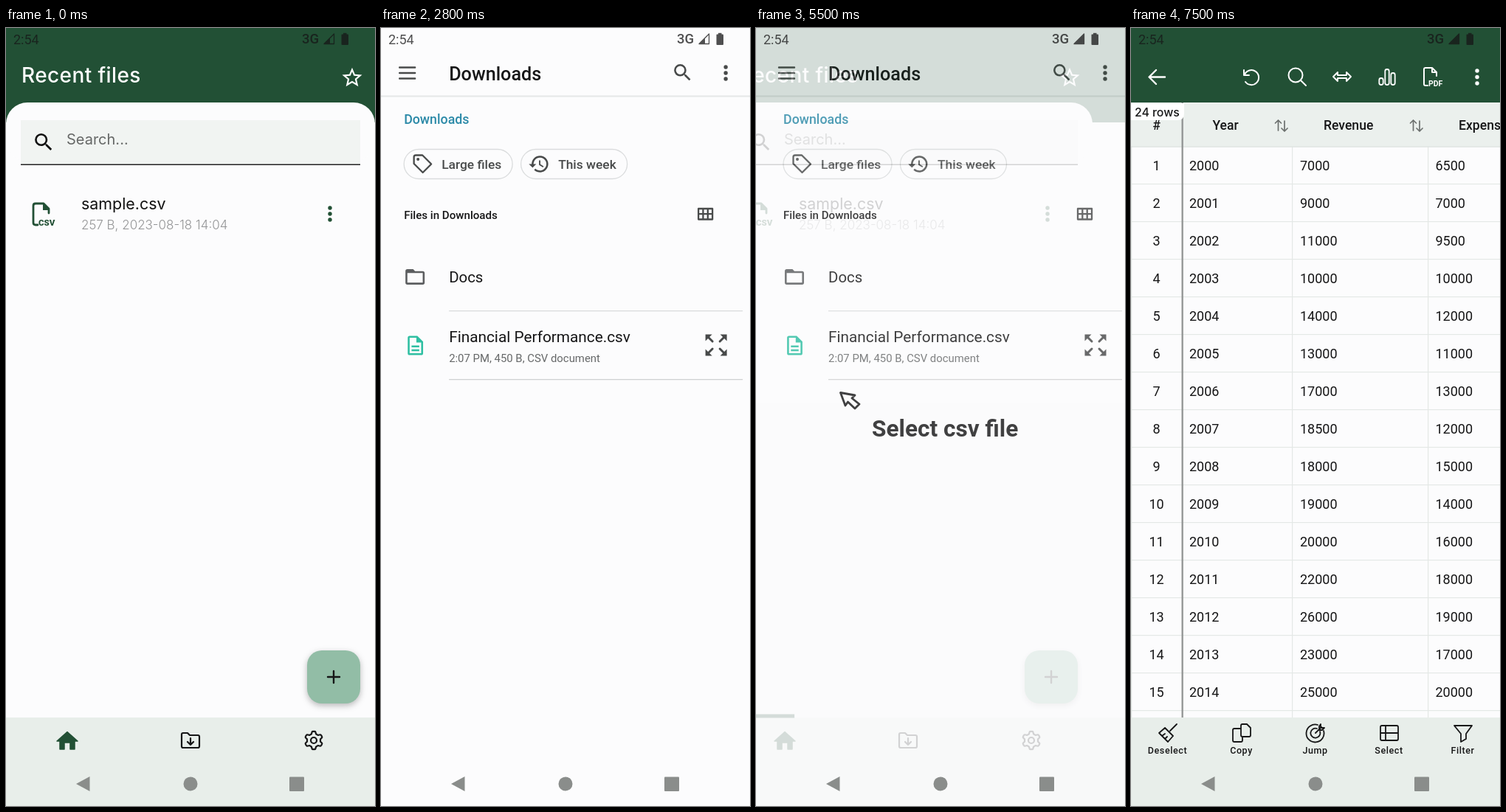
Recreate the animation shown at these times as an HTML page. Size 500 by 1055 pixels, loop 7.6 s.

```html
<!DOCTYPE html>
<html lang="en">
<head>
<meta charset="utf-8">
<title>Import a CSV file</title>
<style>
html, body { margin: 0; width: 100%; height: 100%; overflow: hidden; background: #fcfcfd; }
svg { display: block; width: 100%; height: 100%; }
text { white-space: pre; }
.r { font-family: Roboto, sans-serif; }
.i { font-family: Inter, sans-serif; }
</style>
</head>
<body>
<svg id="stage" viewBox="0 0 500 1055"></svg>
<script>
const GREEN = '#225035', MIST = '#e8eeea', PAPER = '#fcfcfd', WHITE = '#fff';
const INK = '#161617', GRAY = '#484a4a', KEY = '#8a8d8b';
const LOOP = 7600;

// Markup helpers
const rect = (x, y, w, h, fill, more = '') =>
  `<rect x="${x}" y="${y}" width="${w}" height="${h}" fill="${fill}" ${more}/>`;
const dot = (x, y, r, fill, more = '') => `<circle cx="${x}" cy="${y}" r="${r}" fill="${fill}" ${more}/>`;
const text = (s, x, y, size, fill, more = '', font = 'r') =>
  `<text class="${font}" x="${x}" y="${y}" font-size="${size}" fill="${fill}" ${more}>${s}</text>`;
const line = (d, color, width = 2, fill = 'none') =>
  `<path d="${d}" fill="${fill}" stroke="${color}" stroke-width="${width}" stroke-linejoin="round" stroke-linecap="round"/>`;
const icon = (d, x, y, scale, fill) =>
  `<path transform="translate(${x} ${y}) scale(${scale}) translate(-12 -12)" d="${d}" fill="${fill}"/>`;
const at = (x, y, s) => `<g transform="translate(${x} ${y})">${s}</g>`;
const dots = (x, y, gap, fill) => [-gap, 0, gap].map(d => dot(x, y + d, 2.7, fill)).join('');
const group = (id, s) => `<g id="${id}">${s}</g>`;
const MEDIUM = 'font-weight="500"', MIDDLE = 'text-anchor="middle"';

const SEARCH = 'M15.5 14h-.79l-.28-.27A6.47 6.47 0 0 0 16 9.5 6.5 6.5 0 1 0 9.5 16c1.61 0 3.09-.59 4.23-1.57l.27.28v.79l5 4.99L20.49 19zm-6 0a4.5 4.5 0 1 1 0-9 4.5 4.5 0 0 1 0 9z';
const STAR = 'M22 9.24l-7.19-.62L12 2 9.19 8.63 2 9.24l5.46 4.73L5.82 21 12 17.27 18.18 21l-1.63-7.03zM12 15.4l-3.76 2.27 1-4.28-3.32-2.88 4.38-.38L12 6.1l1.71 4.04 4.38.38-3.32 2.88 1 4.28z';
const HISTORY = 'M13 3a9 9 0 0 0-9 9H1l3.89 3.89.07.14L9 12H6a7 7 0 1 1 2.06 4.94l-1.42 1.42A9 9 0 1 0 13 3zm-1 5v5l4.28 2.54.72-1.21-3.5-2.08V8z';
const FOLDER = 'M20 6h-8l-2-2H4a2 2 0 0 0-2 2v12a2 2 0 0 0 2 2h16a2 2 0 0 0 2-2V8a2 2 0 0 0-2-2zm0 12H4V8h16z';
const DOC = 'M8 16h8v2H8zm0-4h8v2H8zm6-10H6a2 2 0 0 0-2 2v16a2 2 0 0 0 2 2h12a2 2 0 0 0 2-2V8zm4 18H6V4h7v5h5z';

function gear() {
  let d = '';
  for (let k = 0; k < 72; k++) {
    const a = k * Math.PI / 36, r = 10.6 + 1.6 * Math.tanh(3 * Math.cos(6 * a));
    d += `${k ? 'L' : 'M'}${(r * Math.sin(a)).toFixed(1)} ${(r * Math.cos(a)).toFixed(1)}`;
  }
  return line(d + 'z', INK, 2.2) + dot(0, 0, 4, 'none', `stroke="${INK}" stroke-width="2.2"`);
}

function homePage() {
  return rect(-60, 0, 620, 128, GREEN) +
    rect(-60, 128, 620, 820, PAPER) +
    rect(0, 101, 500, 80, PAPER, 'rx="29"') +
    text('Recent files', 21, 74, 28, WHITE, `${MEDIUM} letter-spacing=".4"`, 'i') +
    icon(STAR, 469, 67.2, 1.35, WHITE) +
    rect(20, 125, 460, 60, '#f1f4f2') + rect(20, 184.5, 460, 1.5, '#222') +
    icon(SEARCH, 51, 154.8, 1.32, '#111') +
    text('Search...', 82, 158, 20, '#666867', '', 'i') +
    line('M43 267h-3q-3 0-3-3v-23q0-3 3-3h11l7 7v6', GREEN, 2.8) +
    `<path d="M50 237v10h9z" fill="${GREEN}"/>` +
    text('CSV', 44, 267.5, 11.5, GREEN, 'font-weight="900"') +
    text('sample.csv', 102, 246, 21.4, '#111', '', 'i') +
    text('257 B, 2023-08-18 14:04', 102, 273, 17, '#949596', 'font-weight="300"', 'i') +
    dots(439, 252, 8, GREEN) +
    rect(408, 844, 72, 72, '', 'id="fab" rx="20" style="filter:drop-shadow(0 3px 4px #0004)"') +
    dot(447, 877, 13.5, '#b3bdb8', 'id="touch" opacity=".85"') +
    line('M436 880h16M444 872v16', INK, 2.4) +
    rect(-60, 935, 620, 120, MIST) +
    rect(0, 930.5, 0, 5, GREEN, 'id="bar1"') + rect(0, 930.5, 0, 5, GREEN, 'id="bar2"') +
    line('M69 967L83 954.500 97 967H93V978H87V969H79V978H73V967z', GREEN, 1.5, GREEN) +
    at(250, 966, line('M-12-8q0-2 2-2h6l3 3h11q2 0 2 2V8q0 2-2 2H-10q-2 0-2-2zM0-3V6M-4 2L0 6 4 2', INK, 2.2)) +
    at(417, 966, gear());
}

function downloadsPage() {
  const corner = line('M5 5L12 12', GRAY, 3) + `<path d="M14.500 5.500v9h-9z" fill="${GRAY}"/>`;
  const chip = (x, w) => rect(x, 164.5, w, 40, 'none', 'rx="20" stroke="#dadcdd" stroke-width="1.3"');
  return rect(-60, 0, 620, 1055, PAPER) +
    rect(-60, 91.5, 620, 2, '#e6e8e8') +
    line('M25 53.500h21M25 61h21M25 68.500h21', GRAY, 2.4) +
    text('Downloads', 92, 70.5, 25.2, INK, MEDIUM) +
    icon(SEARCH, 408.5, 60.5, 1.28, GRAY) + dots(467, 61, 8, GRAY) +
    text('Downloads', 31, 130, 17.8, '#2c8aa8', MEDIUM) +
    chip(31, 147) + chip(189.5, 144) +
    line('M47 172.500h9L68 184.500 56.500 196 44.500 184v-9q0-2.500 2.500-2.500z', GRAY, 2.3) + dot(50, 178, 2, GRAY) +
    text('Large files', 82, 190.5, 17.4, GRAY, MEDIUM) +
    icon(HISTORY, 214, 184.500, 1.25, GRAY) +
    text('This week', 240, 190.5, 17.4, GRAY, MEDIUM) +
    text('Files in Downloads', 31, 259, 15.1, INK, MEDIUM) +
    line('M430 245h19v14.500h-19zM430 252.200h19M436.300 245v14.500M442.700 245v14.500', GRAY, 2.3) +
    icon(FOLDER, 46, 337.5, 1.3, '#5c5e60') +
    text('Docs', 92, 345, 20.4, INK) +
    rect(92, 383, 398, 1.3, '#dadcdd') +
    icon(DOC, 46.5, 430.5, 1.3, '#2fbfa2') +
    text('Financial Performance.csv', 92, 426, 20.8, INK) +
    text('2:07 PM, 450 B, CSV document', 92, 452.5, 14.9, '#666869') +
    [0, 90, 180, 270].map(a => `<g transform="translate(454 430) rotate(${a})">${corner}</g>`).join('') +
    rect(92, 476, 398, 1.3, '#cfd1d2');
}

function tablePage() {
  const revenue = [70, 90, 110, 100, 140, 130, 170, 185, 180, 190, 200, 220, 260, 230, 250, 300];
  const expenses = [65, 70, 95, 100, 120, 110, 130, 120, 150, 140, 160, 180, 190, 170, 200, 180];
  const grid = '#e4e8e6';
  let rows = '';
  revenue.forEach((value, k) => {
    const y = 193 + 51 * k;
    rows += text(k + 1, 34.5, y, 18, INK, MIDDLE) + text(2000 + k, 79, y, 18, INK) +
      text(value * 100, 229, y, 18, INK) + text(expenses[k] * 100, 412.5, y, 18, INK) +
      rect(0, 211 + 51 * k, 500, 1.2, grid);
  });
  const sort = x => line(`M${x - 4.500} 139v-14m-4 4l4-4 4 4M${x + 4} 126v14m-4-4l4 4 4-4`, '#6c706e', 1.7);
  const tools = [
    [163, line('M-10-9v7h7M-9-3A10 10 0 1 1-8 7', WHITE)],
    [225, dot(-2, -2, 9.5, 'none', `stroke="${WHITE}" stroke-width="2"`) + line('M5 5L12 12', WHITE)],
    [286, line('M-12 0l6-6v4H6v-4l6 6-6 6V2H-6v4z', WHITE, 1.9)],
    [347, [[-8, 2], [0, -10], [8, -5]].map(([x, y]) =>
      rect(x - 2.7, y, 5.4, 11 - y, 'none', `rx="2.500" stroke="${WHITE}" stroke-width="1.8"`)).join('')],
    [407, line('M-5 12h-3q-2 0-2-2v-20q0-2 2-2H1l6 6v5M1-12v6h6', WHITE) +
      text('PDF', -4, 13, 10.5, WHITE, 'font-weight="700"')]
  ];
  const actions = [
    ['Deselect', 'M12-12L3-3M-4-7L7 4M-4-7L-12 0 0 12 7 4M-8 4l4-3M-4 8l3-3'],
    ['Copy', 'M1-12h6l5 5V3q0 2-2 2H1q-2 0-2-2v-13q0-2 2-2zM-1-6h-9q-2 0-2 2V10q0 2 2 2h9q2 0 2-2V5'],
    ['Jump', 'M3-11A12 12 0 1 0 11-3M2-6A6.500 6.500 0 1 0 6-2M0 0L8-8M7-12V-7h5l-3 3H5v-5z'],
    ['Select', 'M-10-10h20q2 0 2 2V8q0 2-2 2h-20q-2 0-2-2V-8q0-2 2-2zM-5-10V10M-12 0h24'],
    ['Filter', 'M-12-10H12L4 1V8l-7 4V1z']
  ];
  return rect(0, 0, 500, 1055, PAPER) + rows +
    [0, 218, 402].map(x => rect(x, 161, 1.2, 790, grid)).join('') +
    rect(0, 101, 500, 60, '#ebf0ed') + rect(0, 160.5, 500, 1.2, '#dce2df') +
    rect(68.5, 101, 2.3, 850, '#919493') +
    text('#', 34.5, 138, 17.6, INK, `${MEDIUM} ${MIDDLE}`) +
    text('Year', 110.5, 138, 17.5, INK, MEDIUM) + sort(204) +
    text('Revenue', 261, 138, 17.6, INK, MEDIUM) + sort(387) +
    text('Expenses', 444, 138, 17.6, INK, MEDIUM) +
    rect(0, 0, 500, 101, GREEN) +
    line('M46 66.500H25M34 57l-9.500 9.500 9.500 9.500', WHITE, 2.4) + dots(469, 66.5, 8.5, WHITE) +
    rect(0, 995, 500, 60, MIST) +
    group('importing', rect(0, 948, 500, 47, PAPER) +
      text('Importing', 10, 982, 17, INK, '', 'i') +
      text('25 rows', 214.5, 982.5, 17.5, INK, MEDIUM, 'i')) +
    group('done', tools.map(([x, s]) => at(x, 66, s)).join('') +
      `<path d="M0 102H72V116q0 9-9 9H0z" fill="${WHITE}"/>` +
      text('24 rows', 5, 120, 15.8, INK, MEDIUM, 'i') +
      rect(0, 935, 500, 120, MIST) +
      actions.map(([name, d], k) => at(50 + 100 * k, 956, line(d, INK, 1.8)) +
        text(name, 49.5 + 100 * k, 984, 12.5, INK, `${MEDIUM} ${MIDDLE} letter-spacing=".6"`)).join(''));
}

const systemBars = `<g opacity=".75">` +
  text('2:54', 10, 21.5, 18, INK) + text('3G', 401, 21, 18.5, INK, MEDIUM) +
  line('M431 21.500H444.500V8z', INK, 1.3) +
  `<path id="signal" fill="${INK}"/>` +
  rect(454.5, 8.5, 9.5, 14.5, INK, 'rx="1"') + rect(457, 6.8, 4.5, 3, INK) + '</g>' +
  `<path d="M95 1025L113.500 1015V1035z" fill="${KEY}"/>` +
  dot(250, 1025, 9.5, KEY) + rect(384, 1015.5, 20, 19.5, KEY, 'rx="1"');

document.getElementById('stage').innerHTML =
  group('home', homePage()) + group('downloads', downloadsPage()) + group('table', tablePage()) + systemBars +
  group('tapHint', line('M361 793Q378 781 395 779L401 816 414 817 408 851 378 829 389 823z', '#bd1f1f', 7, WHITE)) +
  group('pickHint', line('M114.500 494.500L134 498 130 502 140 510 134 516 124.500 507 121 512z', '#404041', 2.8, PAPER) +
    text('Select csv file', 157, 554, 31.6, '#404041', 'font-weight="700"'));

const $ = id => document.getElementById(id);
const clamp = v => Math.min(1, Math.max(0, v));
const show = (id, on) => $(id).setAttribute('display', on ? 'inline' : 'none');
const set = (id, name, value) => $(id).setAttribute(name, value);

// Height of a cubic curve where it crosses x
function curve(x, x0, y0, x1, y1, x2, y2, x3, y3) {
  const mix = (u, a, b, c, d) => {
    const v = 1 - u;
    return a * v * v * v + 3 * b * u * v * v + 3 * c * u * u * v + d * u * u * u;
  };
  let lo = 0, hi = 1;
  for (let k = 0; k < 24; k++) {
    const mid = (lo + hi) / 2;
    if (mix(mid, x0, x1, x2, x3) < x) lo = mid; else hi = mid;
  }
  return mix(lo, y0, y1, y2, y3);
}
const ease = (x, a, b, c, d) => curve(clamp(x), 0, 0, a, b, c, d, 1, 1);
function slide(x) {
  x = clamp(x);
  return x < 1 / 6 ? curve(x, 0, 0, .05, 0, .1333, .06, 1 / 6, .4)
    : curve(x, 1 / 6, .4, .2083, .82, .25, 1, 1, 1);
}

function setBar(id, tail, head) {
  set(id, 'x', 500 * tail);
  set(id, 'width', 500 * Math.max(0, head - tail));
}
function progress(t) {
  const running = t > 1377;
  show('bar1', running);
  show('bar2', running);
  if (!running) return;
  const p = (t < 3000 ? 116 + (t - 1600) * .52 : 183 + t - 5500 + 3600) % 1800;
  setBar('bar1', ease((p - 333) / 750, .4, 0, 1, 1), ease(p / 750, .2, 0, .8, 1));
  setBar('bar2', ease((p - 1267) / 533, .1, 0, .45, 1), ease((p - 1000) / 567, 0, 0, .65, 1));
}

const OPEN = 2417, CLOSE = 5451, TABLE = 5900, DONE = 6800;

function draw(t) {
  const away = slide((t - OPEN) / 450) - slide((t - CLOSE) / 450);
  const shown = clamp((t - OPEN - 50) / 83) - clamp((t - CLOSE - 35) / 83);
  set('home', 'transform', `translate(${-50 * away} 0)`);
  set('downloads', 'transform', `translate(${50 - 50 * away} 0)`);
  set('downloads', 'opacity', shown);
  progress(t);

  const press = clamp((t - 1400) / 150) - clamp((t - 2000) / 300);
  const mix = (a, b) => Math.round(a + (b - a) * press);
  set('fab', 'fill', `rgb(${mix(146, 131)},${mix(189, 170)},${mix(166, 149)})`);
  show('touch', t >= 1400 && t < 2000);
  show('tapHint', t >= 800 && t < 2300);
  show('pickHint', t >= 3300 && t < 5700);
  set('signal', 'd', t < 4600 ? 'M431 21.500H439V13.500z' : 'M431 21.500H444.500V8z');

  const enter = clamp((t - TABLE) / 250), scale = .9 + .1 * slide(enter);
  set('table', 'opacity', enter);
  set('table', 'transform', `translate(250 527) scale(${scale}) translate(-250 -527)`);
  show('table', enter > 0);
  show('importing', t < DONE);
  show('done', t >= DONE);
}

const start = performance.now();
function tick() {
  draw((performance.now() - start) % LOOP);
  requestAnimationFrame(tick);
}
tick();
</script>
</body>
</html>
```
